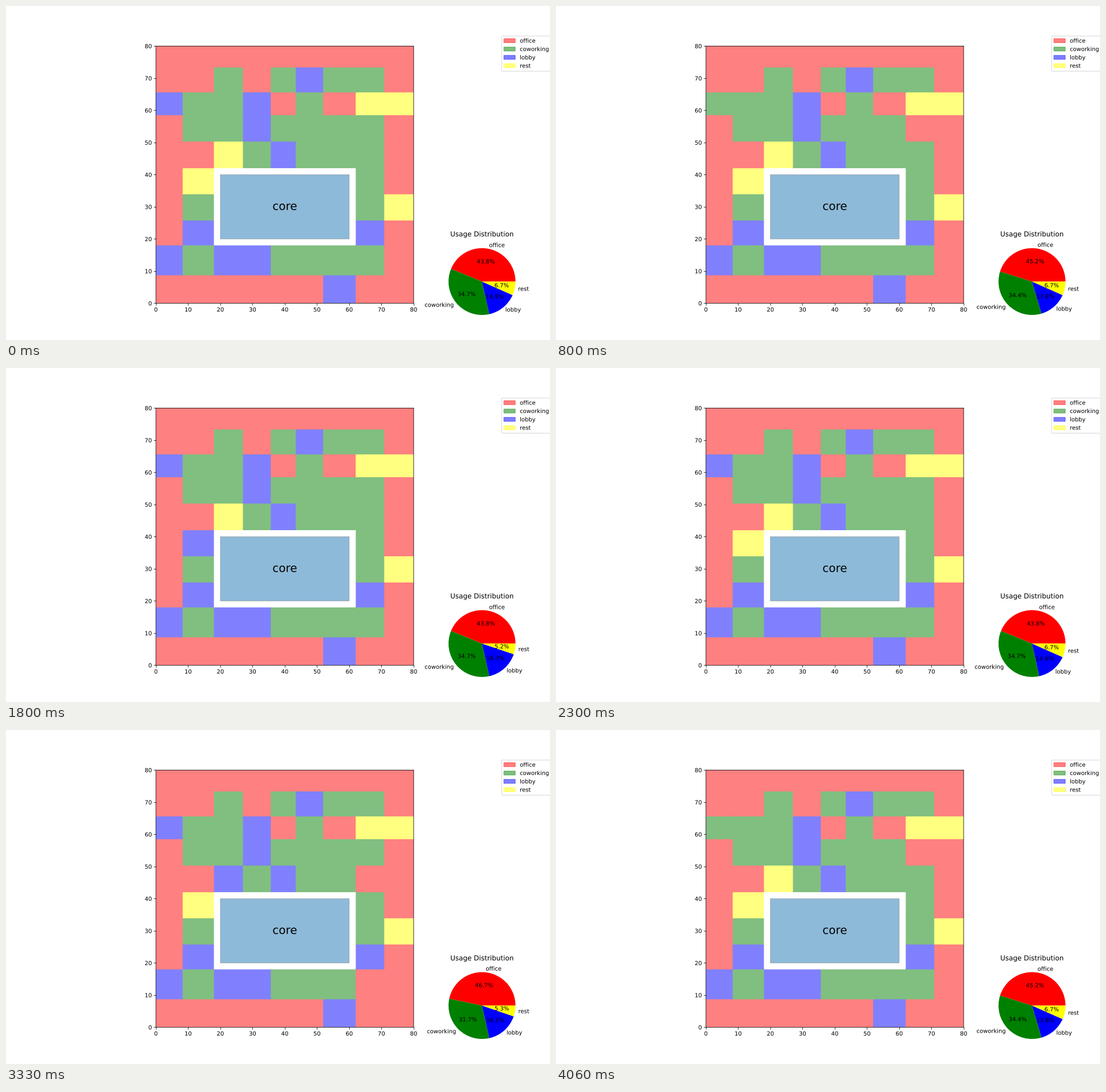
A matplotlib script that plays this animation: 954 px wide and 587 px high, repeating every 4.16 s.

```python
import numpy as np
import matplotlib.pyplot as plt
from matplotlib.animation import FuncAnimation
from matplotlib.patches import Patch, Rectangle
from matplotlib.patheffects import Normal

DPI = 72
STEP = 20        # ms per animation tick
LOOP = 4160      # ms
OVERLAP = 0.5    # cells reach under their neighbours, so no seams show

# Smooth subpixel lines and lettering
plt.rcParams.update({"path.snap": False, "path.effects": [Normal()],
                     "text.hinting": "none"})

USES = {"o": ("office", "red"), "c": ("coworking", "green"),
        "l": ("lobby", "blue"), "r": ("rest", "yellow")}
PALE = {"o": (1, 0.5, 0.5), "c": (0.5, 0.75, 0.5),
        "l": (0.5, 0.5, 1), "r": (1, 1, 0.5)}

X = [0, 8.3, 18, 27, 35.65, 43.4, 51.9, 62, 70.86, 80]
Y = [0, 8.7, 18, 25.75, 33.9, 42, 50.3, 58.5, 65.6, 73.35, 80]

# Floor plan from the bottom row up; dots are covered by the core
PLAN = ["ooooooloo",
        "lcllcccco",
        "ol.....lo",
        "oc.....cr",
        "or.....co",
        "oorclccco",
        "occlcccco",
        "lcclocorr",
        "oococlcco",
        "ooooooooo"]

# Each variant changes a few cells of the plan: (row, column, use)
VARIANTS = {"A": [],
            "B": [(7, 0, "c"), (6, 7, "o")],
            "C": [(1, 0, "c"), (1, 2, "c")],
            "D": [(4, 1, "l")],
            "E": [(5, 2, "l"), (5, 7, "o"), (1, 7, "o")],
            "F": [(8, 3, "c")]}

SEQUENCE = "A" "BACBAB" "ABDABC" "BAFBAD" "BACBAB" "ACBFBA" "BDBEBA" "BEACAB"
durations = np.full(len(SEQUENCE), 100)
durations[[29, 41]] = 30
starts = np.cumsum(durations) - durations


def layout(variant):
    cells = {(r, c): use for r, row in enumerate(PLAN)
             for c, use in enumerate(row) if use != "."}
    cells.update({(r, c): use for r, c, use in VARIANTS[variant]})
    return cells


def cell_size(r, c):
    return X[c + 1] - X[c], Y[r + 1] - Y[r]


fig, ax = plt.subplots(figsize=(954 / DPI, 587 / DPI), dpi=DPI)
ax.set(xlim=(0, 80), ylim=(0, 80), aspect="equal")
pie_ax = fig.add_axes([0.75, 0.05, 0.25, 0.25])

rects = {}
for r, c in layout("A"):
    w, h = cell_size(r, c)
    rects[r, c] = ax.add_patch(
        Rectangle((X[c], Y[r]), w + OVERLAP, h + OVERLAP, lw=0))

ax.add_patch(Rectangle((18, 18), 44, 24, color="white", lw=0))
ax.add_patch(Rectangle((20, 20), 40, 20, fc="tab:blue", ec="gray", alpha=0.5))
ax.text(40, 30, "core", fontsize=20, ha="center", va="center")
ax.legend(handles=[Patch(color=color, alpha=0.5, label=name)
                   for name, color in USES.values()],
          loc="upper left", bbox_to_anchor=(1.33, 1.05))


def show(variant):
    areas = dict.fromkeys(USES, 0)
    for pos, use in layout(variant).items():
        rects[pos].set_facecolor(PALE[use])
        areas[use] += np.prod(cell_size(*pos))
    names, colors = zip(*USES.values())
    pie_ax.clear()
    pie_ax.pie(list(areas.values()), labels=names, colors=colors,
               autopct="%1.1f%%")
    pie_ax.set_title("Usage Distribution")


shown = None


def update(tick):
    global shown
    time = tick * STEP + STEP / 2
    variant = SEQUENCE[np.searchsorted(starts, time, side="right") - 1]
    if variant != shown:
        show(variant)
        shown = variant
    return []


anim = FuncAnimation(fig, update, frames=LOOP // STEP, interval=STEP,
                     repeat=True, repeat_delay=0, blit=False)
plt.show()
```
